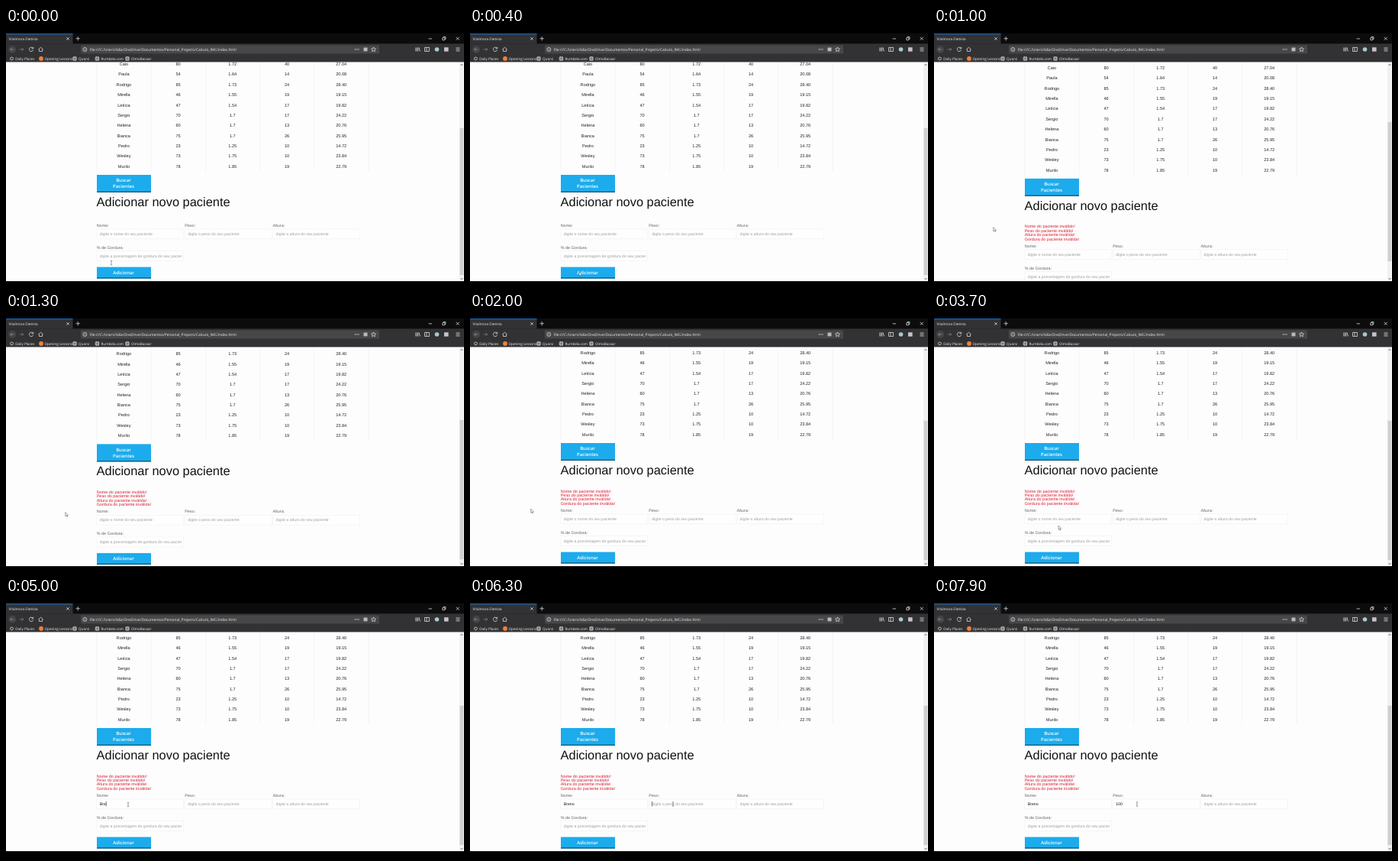
These frames come from a looping animation (600 by 336 pixels, 8000 ms). An HTML page:

```html
<!DOCTYPE html>
<html lang="pt">
<head>
<meta charset="utf-8">
<title>Cadastro de pacientes</title>
<style>
html, body { margin: 0; height: 100%; overflow: hidden; background: #000; }
svg { display: block; width: 600px; height: 336px; }
text { font-family: "Liberation Sans", Arial, sans-serif; font-size: 5.6px; fill: #222; text-rendering: geometricPrecision; white-space: pre; }
.mid { text-anchor: middle; }
.label { font-size: 5.45px; fill: #666; }
.error { font-size: 5.47px; fill: #dc1c32; }
.input { font-size: 5.2px; fill: #111; }
.hint { font-size: 5.2px; fill: #a0a0a0; }
.title { font-size: 16.4px; fill: #111; }
.btn { font: 600 6px "Open Sans", sans-serif; fill: #fff; text-anchor: middle; }
.ui { font-family: "Open sans", "Open Sans", sans-serif; font-size: 4.6px; fill: #f0f0f2; }
.icon { fill: none; stroke: #d8d8da; stroke-width: .8; }
</style>
</head>
<body>
<svg viewBox="0 0 600 336">
  <rect y="44" width="600" height="287" fill="#fdfdfd"/>
  <g id="upper"></g>
  <g id="lower"></g>
  <g id="bar">
    <rect x="594" y="45" width="6" height="286" fill="#f1f1f1"/>
    <rect id="thumb" x="594.5" width="5" fill="#cfcfcf"/>
    <path d="M595.5 49l1.5-1.7 1.5 1.7M595.5 327l1.5 1.7 1.5-1.7" fill="none" stroke="#555" stroke-width=".8"/>
  </g>
  <g id="chrome"></g>
  <path id="arrow" d="M0 0v5.2l1.2-1.1.9 1.9.8-.4-.8-1.8h1.6z" fill="#fff" stroke="#444" stroke-width=".5"/>
  <path id="beam" d="M-1.2-2.7h.9l.3.3.3-.3h.9M0-2.4v4.8M-1.2 2.7h.9l.3-.3.3.3h.9" fill="none" stroke="#555" stroke-width=".6"/>
</svg>
<script>
const $ = id => document.getElementById(id);
const text = (x, y, s, cls = "", id = "") => `<text x="${x}" y="${y}" class="${cls}" id="${id}">${s}</text>`;
const rect = (x, y, w, h, fill, more = "") => `<rect x="${x}" y="${y}" width="${w}" height="${h}" fill="${fill}" ${more}/>`;
const icon = d => `<path class="icon" d="${d}"/>`;
const dot = (x, y, r, fill) => `<circle cx="${x}" cy="${y}" r="${r}" fill="${fill}"/>`;
const ring = (x, y, r) => `<circle class="icon" cx="${x}" cy="${y}" r="${r}"/>`;
const button = (y, h) => rect(119, y, 71, h, "#1cabec") + rect(119, y + h - 1.3, 71, 1.3, "#14597c");

// Table, search button and heading
const patients = [
  "Caio 80 1.72 40 27.04", "Paula 54 1.64 14 20.08", "Rodrigo 85 1.73 24 28.40",
  "Mirella 46 1.55 19 19.15", "Letícia 47 1.54 17 19.82", "Sergio 70 1.7 17 24.22",
  "Helena 60 1.7 13 20.76", "Bianca 75 1.7 26 25.95", "Pedro 23 1.25 10 14.72",
  "Wesley 73 1.75 10 23.84", "Murilo 78 1.85 19 22.79"
];
let table = "";
for (let i = 0; i < 6; i++) table += rect(118.7 + i * 71.2, 10, .6, 155.5, "#efefef");
patients.forEach((row, r) => row.split(" ").forEach((cell, c) => {
  table += text(154.4 + c * 71.2, 27.1 + r * 13.37, cell, "mid");
}));
$("upper").innerHTML = table + button(170, 23)
  + text(154, 179.2, "Buscar", "btn") + text(154, 187.2, "Pacientes", "btn")
  + text(118.6, 210.8, "Adicionar novo paciente", "title");

// Form
const field = (x, y, label, hint, id) => text(x, y, label, "label")
  + rect(x + .3, y + 2.9, 113.5, 12.8, "#fefefe", 'stroke="#f1f1f1" stroke-width=".6"')
  + `<svg x="${x}" y="${y}" width="111.5" height="16">`
  + text(4, 11, hint, "hint", id + "Hint") + text(4, 11, "", "input", id) + "</svg>";
const errors = ["Nome do paciente inválido!", "Peso do paciente inválido!", "Altura do paciente inválida!", "Gordura do paciente inválida!"];
$("lower").innerHTML = `<g id="errors">${errors.map((s, i) => text(118.7, 234.5 + i * 5.4, s, "error")).join("")}</g>`
  + field(118.7, 260, "Nome:", "digite o nome do seu paciente", "name")
  + field(234.2, 260, "Peso:", "digite o peso do seu paciente", "weight")
  + field(349.5, 260, "Altura:", "digite a altura do seu paciente", "height")
  + field(118.7, 288.7, "% de Gordura:", "digite a porcentagem de gordura do seu paciente", "fat")
  + button(312.5, 15) + text(154, 322, "Adicionar", "btn")
  + rect(0, 266, .6, 6.4, "#222", 'id="caret"');

// Browser window
const globe = x => dot(x, 40, 2.9, "#b9b9bc") + `<path d="M${x - 2.9} 40h5.8M${x} 37.1v5.8" stroke="#444" stroke-width=".6"/>`;
$("chrome").innerHTML = rect(0, 0, 600, 7, "#000") + rect(0, 331, 600, 5, "#000")
  + rect(0, 7, 600, 14, "#0c0c0d") + rect(0, 20.5, 600, 24, "#323234")
  + rect(0, 7.5, 87.5, 13.2, "#323234") + rect(0, 7.5, 87.5, .8, "#0a84ff")
  + text(3.5, 15.6, "Vitalmora Dietista", "ui")
  + icon("M79.3 12.3l3.4 3.4m0-3.4l-3.4 3.4M91.5 13.8h5.4M94.2 11.1v5.4M553.5 14h4.5M589.7 11.8l4 4m0-4l-4 4M571.8 12.8h3v3h-3zM573 12.7v-1.1h3v3h-1.1")
  + dot(8.3, 28, 5, "#444447")
  + `<g opacity=".45">${icon("M10.7 28h-5m2-2l-2 2 2 2M17.7 28h5m-2-2l2 2-2 2")}</g>`
  + icon("M35.2 26.2a2.7 2.7 0 1 0 .5 2.5M35.7 24.8v2.2h-2.2M42.4 28l3.1-2.7 3.1 2.7M43.4 27.5v3h4.2v-3")
  + rect(98, 22.5, 391, 11, "#474749", 'rx="1"')
  + ring(103.3, 28, 2.5) + icon("M103.3 27.6v1.8M103.3 26.3v.6")
  + text(109.7, 29.8, "file:///C:/Users/lidia/OneDrive/Documentos/Personal_Projects/Calculo_IMC/index.html", "ui", "url")
  + [457.5, 459.7, 461.9].map(x => dot(x, 28, .7, "#d8d8da")).join("")
  + rect(468.5, 25.6, 5, 4.8, "#b9b9bc")
  + icon("M481.5 25l.9 2 2.1.2-1.6 1.4.5 2.1-1.9-1.1-1.9 1.1.5-2.1-1.6-1.4 2.1-.2z")
  + icon("M536.8 25.5v5M538.4 25.5v5M540 25.5v5M541 25.5l1.5 5M548.5 25.5h6v5h-6zM551 25.5v5M589.5 26h5M589.5 28h5M589.5 30h5")
  + dot(564.5, 28, 2.8, "#a9c9d2") + rect(574, 25.3, 5.6, 5.4, "#c4c4c6")
  + ring(7.5, 40, 1.9) + text(12.2, 41.7, "Daily Places", "ui")
  + dot(46, 40, 2.9, "#f0803c") + text(50.5, 41.7, "Opening Lessons", "ui")
  + globe(90) + text(95, 41.7, "Quorvi", "ui")
  + globe(119.5) + text(124.5, 41.7, "Rumbela.com", "ui")
  + globe(159) + text(164, 41.7, "OlmoBazaar", "ui");
$("url").style.fontSize = "4.8px";

// Motion
const CLICK = 450, NAME_FOCUS = 4200, WEIGHT_FOCUS = 6000;
const path = [
  [0, 138, 307], [100, 138, 307], [350, 143, 319], [500, 143, 319], [900, 77.8, 260.5],
  [1500, 77.8, 260.5], [1900, 79.7, 256], [2900, 79.7, 256], [3600, 163, 278],
  [3800, 163, 278], [4100, 160, 270], [5400, 160, 270], [5900, 266, 269.5], [8000, 266, 269.5]
];
const clamp = v => Math.max(0, Math.min(1, v));
const smooth = v => v * v * (3 - 2 * v);
const show = (id, on) => { $(id).style.display = on ? "" : "none"; };
const move = (id, x, y) => $(id).setAttribute("transform", `translate(${x} ${y})`);

function pointer(t) {
  const i = path.findIndex(p => p[0] > t), [t0, x0, y0] = path[i - 1], [t1, x1, y1] = path[i];
  const k = smooth((t - t0) / (t1 - t0));
  return [x0 + (x1 - x0) * k, y0 + (y1 - y0) * k];
}

// Types a word into a field and returns the time of the last key
function type(id, word, start, step, t) {
  const n = Math.max(0, Math.min(word.length, Math.floor((t - start) / step) + 1));
  $(id).textContent = word.slice(0, n);
  show(id + "Hint", n === 0);
  return n ? start + (n - 1) * step : 0;
}

function draw(t) {
  const sent = t >= CLICK;
  let scroll = 0;
  if (sent) {
    scroll = t < 1000 ? 22 + 5 * smooth(clamp((t - 650) / 250)) : 27 * (1 - clamp((t - 1000) / 480)) ** 3;
  }
  move("upper", 0, sent ? scroll : 22);
  move("lower", 0, scroll);
  show("errors", sent);

  const view = 286, page = sent ? 427 : 405, ratio = view / page, size = 272 * ratio;
  $("thumb").setAttribute("y", 323 - size - scroll * ratio);
  $("thumb").setAttribute("height", size);

  const nameKey = type("name", "Breno", 4600, 160, t);
  const weightKey = type("weight", "100", 6900, 200, t);
  const inWeight = t >= WEIGHT_FOCUS;
  const since = t - (inWeight ? Math.max(WEIGHT_FOCUS, weightKey) : Math.max(NAME_FOCUS, nameKey));
  show("caret", t >= NAME_FOCUS && since % 1000 < 500);
  const active = inWeight ? "weight" : "name";
  const width = $(active).textContent ? $(active).getComputedTextLength() + .3 : 0;
  $("caret").setAttribute("x", (inWeight ? 238 : 122.5) + width);

  const [x, y] = pointer(t), py = y - scroll;
  const over = x > 119 && x < 464 && (py > 262 && py < 276 || x < 233 && py > 291 && py < 308);
  show("beam", over);
  show("arrow", !over);
  move(over ? "beam" : "arrow", x, y);
}

const begin = performance.now();
function tick() {
  draw((performance.now() - begin) % 8000);
  requestAnimationFrame(tick);
}
tick();
</script>
</body>
</html>
```
